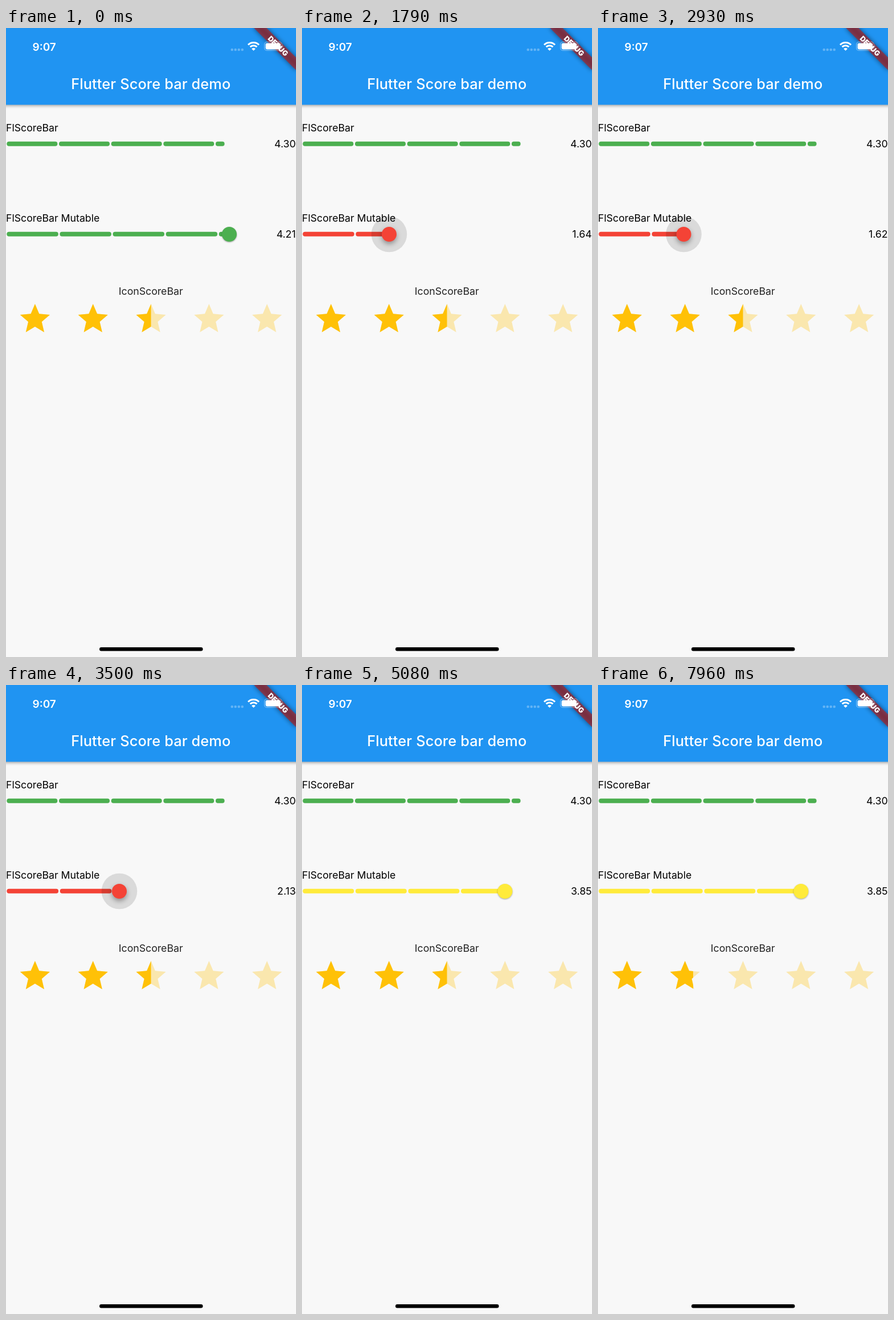
An HTML page for the animation above (7.99 s loop, 509 by 1101 pixels).

```html
<!DOCTYPE html>
<html lang="en">
<head>
<meta charset="utf-8">
<title>Score bar demo</title>
<style>
  html, body { margin: 0; height: 100%; overflow: hidden; background: #f8f8f8; }
  svg { display: block; width: 100vw; height: 100vh; font: 17.7px Inter, Roboto, sans-serif; }
  .title { font-size: 25.3px; font-weight: 500; letter-spacing: .15px; }
  .clock { font-size: 19px; font-weight: 600; }
  .debug { font-size: 12.6px; font-weight: 900; }
  .mid { text-anchor: middle; }
  .end { text-anchor: end; }
</style>
</head>
<body>
<svg viewBox="0 0 509 1101">
  <defs>
    <path id="star" d="M12 17.27 18.18 21l-1.64-7.03L22 9.24l-7.19-.61L12 2 9.19 8.63 2 9.24l5.46 4.73L5.82 21z"/>
    <g id="stars" fill="#ffc107"></g>
    <clipPath id="clip"><rect id="filled" y="470" height="70"/></clipPath>
  </defs>

  <rect x="-20" y="-20" width="549" height="154.4" fill="#2094f2" style="filter:drop-shadow(0 2.5px 2.5px #0005)"/>
  <text class="title mid" x="254.3" y="107" fill="#fff">Flutter Score bar demo</text>

  <text x="0" y="181">FlScoreBar</text>
  <g id="fixedBar" fill="#4caf50"></g>
  <text class="end" x="508.6" y="209">4.30</text>

  <text x="0" y="339">FlScoreBar Mutable</text>
  <g id="slider">
    <g id="bar"></g>
    <circle id="halo" cy="361" fill="#000" fill-opacity=".12"/>
    <circle id="thumb" cy="361" r="13.05"/>
  </g>
  <text class="end" id="score" x="508.6" y="367"></text>

  <text class="mid" x="254.2" y="467" fill="#222">IconScoreBar</text>
  <use href="#stars" opacity=".3"/>
  <use href="#stars" clip-path="url(#clip)"/>

  <g transform="translate(509 0) rotate(45)">
    <rect x="-52.2" y="36.5" width="104.4" height="15.7" fill-opacity=".5" style="filter:blur(4px)"/>
    <rect x="-52.2" y="36.5" width="104.4" height="15.7" fill="#b71c1c" fill-opacity=".627"/>
    <text class="debug mid" y="49" fill="#fff">DEBUG</text>
  </g>

  <g fill="#fff">
    <text class="clock" x="46.5" y="39.7">9:07</text>
    <g fill-opacity=".3">
      <circle cx="396.7" cy="38" r="2.3"/><circle cx="402.7" cy="38" r="2.3"/>
      <circle cx="408.7" cy="38" r="2.3"/><circle cx="414.7" cy="38" r="2.3"/>
    </g>
    <path d="M434.5 39.8l-3.4-3.4a4.8 4.8 0 0 1 6.8 0z"/>
    <path d="M425 29.5a13.5 13.5 0 0 1 19 0M428.6 33.1a8.3 8.3 0 0 1 11.8 0" fill="none" stroke="#fff" stroke-width="3"/>
    <rect x="453.6" y="24.4" width="30.5" height="15" rx="4.3" fill="none" stroke="#fff" stroke-opacity=".4" stroke-width="1.2"/>
    <path d="M485.5 29.5q2.4 2.4 0 5z" fill-opacity=".4"/>
    <rect x="455.6" y="26.4" width="26.5" height="11" rx="2.8"/>
  </g>

  <rect x="164" y="1084" width="181.5" height="6.5" rx="3.25"/>
</svg>
<script>
const LOOP = 7990, CELL = 101.8, ICON = 62.64;
const drag = [[500, 4.21], [1230, 2.47], [2360, 1.22], [3500, 2.13], [4100, 1.7], [4900, 3.85]];
const swipe = [[5840, 2.5], [7960, 1.73]];

const $ = id => document.getElementById(id);
const clamp = x => Math.max(0, Math.min(1, x));
const ease = x => x * x * (3 - 2 * x);

// Smooth curve through [time, value] points, at rest at both ends
function follow(points, t) {
  const last = points.length - 1;
  if (t <= points[0][0]) return points[0][1];
  if (t >= points[last][0]) return points[last][1];
  const i = points.findIndex(p => p[0] > t) - 1;
  const slope = k => k < 1 || k >= last ? 0 :
    (points[k + 1][1] - points[k - 1][1]) / (points[k + 1][0] - points[k - 1][0]);
  const [t0, a] = points[i], [t1, b] = points[i + 1];
  const h = t1 - t0, u = (t - t0) / h;
  return a + (b - a) * ease(u)
    + h * u * (1 - u) * ((1 - u) * slope(i) - u * slope(i + 1));
}

// Rounded pieces, one per whole point, up to the x position "end"
function segments(y, pitch, end) {
  let out = '';
  for (let x = 1.3; x < end; x += pitch) {
    const w = Math.min(pitch - 2.6, end - x);
    out += `<rect x="${x}" y="${y - 4}" width="${w}" height="8" rx="${Math.min(4, w / 2)}"/>`;
  }
  return out;
}

function draw(t) {
  const value = follow(drag, t), text = value.toFixed(2);
  if ($('score').textContent !== text) $('score').textContent = text;
  const pitch = (499.4 - $('score').getComputedTextLength()) / 5;
  const x = value * pitch;
  const press = ease(clamp((t - 490) / 110) * clamp((5080 - t) / 110));

  $('slider').setAttribute('fill', value >= 4 ? '#4caf50' : value >= 3 ? '#ffeb3b' : '#f44336');
  $('bar').innerHTML = segments(360.7, pitch, x);
  $('halo').setAttribute('cx', x);
  $('halo').setAttribute('r', 31.3 * press);
  $('thumb').setAttribute('cx', x);
  $('thumb').style.filter =
    `drop-shadow(0 ${1.2 + 2.8 * press}px ${1 + 3 * press}px rgba(0,0,0,.35))`;

  const stars = follow(swipe, t), whole = Math.floor(stars);
  $('filled').setAttribute('width', whole * CELL + (CELL - ICON) / 2 + (stars - whole) * ICON);
}

for (let i = 0; i < 5; i++) {
  const left = i * CELL + (CELL - ICON) / 2;
  $('stars').innerHTML += `<use href="#star" transform="translate(${left} 477.8) scale(2.61)"/>`;
}
$('fixedBar').innerHTML = segments(202.8, 91.65, 383.6);

function tick(now) {
  draw(now % LOOP);
  requestAnimationFrame(tick);
}
draw(0);
requestAnimationFrame(tick);
</script>
</body>
</html>
```
